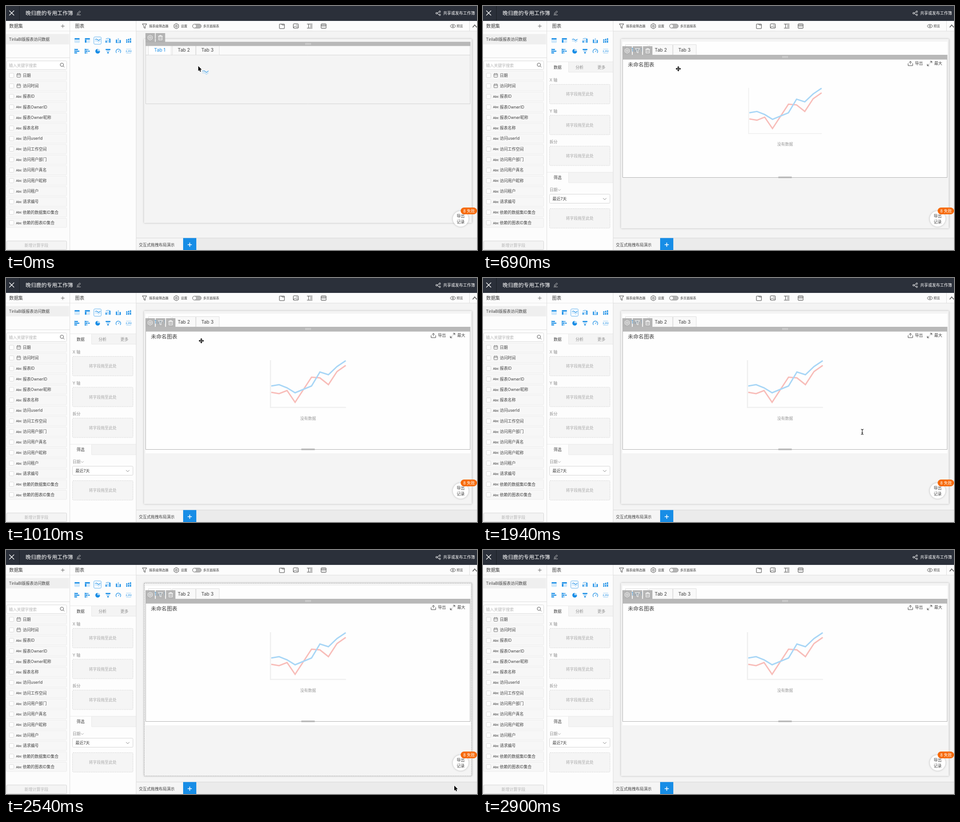
Recreate the animation shown at these times as an HTML page with a canvas. Size 1037 by 540 pixels, loop 3520 ms.

```html
<!DOCTYPE html>
<html lang="zh-CN">
<head>
<meta charset="utf-8">
<style>
html, body { margin: 0; width: 100%; height: 100%; overflow: hidden; background: #f4f4f4; }
canvas { display: block; width: 1037px; height: 540px; }
</style>
</head>
<body>
<canvas id="stage"></canvas>
<script>
const W = 1037, H = 540, LOOP = 3520;
const canvas = document.getElementById('stage');
const c = canvas.getContext('2d');
const dpr = window.devicePixelRatio || 1;
canvas.width = W * dpr;
canvas.height = H * dpr;

const BLUE = '#178de6', PALE = '#9fd0f5', INK = '#404040', MUTED = '#8c8c8c';
const GREY = '#b8b8b8', RULE = '#dedede', SOFT = '#e8e8e8';
const FONT = 'Inter, "Noto Sans CJK SC", "Noto Sans CJK", sans-serif';
const BASE = 8.75, SMALL = 7.1, MID = 10.2, BIG = 11.65;
const times = (n, f) => { for (let i = 0; i < n; i++) f(i); };

function text(s, x, y, size = BASE, color = INK, align = 'left', weight = 400, font = FONT) {
  c.font = `${weight} ${size}px ${font}`;
  c.textAlign = align;
  c.fillStyle = color;
  c.fillText(s, x, y + size * 0.37);
}

function paint(fill, stroke, lw = 1) {
  if (fill) { c.fillStyle = fill; c.fill(); }
  if (stroke) { c.strokeStyle = stroke; c.lineWidth = lw; c.stroke(); }
}

function box(x, y, w, h, fill, stroke, r = 0, lw = 1) {
  c.beginPath();
  c.roundRect(x, y, w, h, r);
  paint(fill, stroke, lw);
}

function dashedBox(...args) {
  c.setLineDash([2.2, 1.6]);
  box(...args);
  c.setLineDash([]);
}

function disc(x, y, r, fill, stroke, lw) {
  c.beginPath();
  c.arc(x, y, r, 0, 7);
  paint(fill, stroke, lw);
}

function trace(pts) {
  c.beginPath();
  for (const [x, y] of pts) c.lineTo(x, y);
}

function path(pts, color, lw = 1) {
  trace(pts);
  paint(null, color, lw);
}

const hr = (x1, x2, y, color = RULE, lw = 1) => path([[x1, y], [x2, y]], color, lw);
const vr = (x, y1, y2, color = RULE, lw = 1) => path([[x, y1], [x, y2]], color, lw);

function at(x, y, draw, ...args) {
  c.save();
  c.translate(x, y);
  draw(...args);
  c.restore();
}

function glow(draw) {
  c.save();
  c.shadowColor = 'rgba(0,0,0,.26)';
  c.shadowBlur = 4 * dpr;
  draw();
  c.restore();
}

// Small icons, each centred on its own origin
function plus(r, color, lw = 1, turn = 0) {
  c.rotate(turn);
  hr(-r, r, 0, color, lw);
  vr(0, -r, r, color, lw);
}

function chevron(w, h, color, lw) {
  path([[-w, -h], [0, h], [w, -h]], color, lw);
}

function gear(color, r = 5.4) {
  trace(Array.from({ length: 6 }, (_, i) => [r * Math.sin(i * Math.PI / 3), r * Math.cos(i * Math.PI / 3)]));
  c.closePath();
  paint(null, color);
  disc(0, 0, r * 0.36, null, color);
}

function funnel(color) {
  const r = 4.8, n = 1.4;
  trace([[-r, -r], [r, -r], [n, 0], [n, r], [-n, r - n], [-n, 0]]);
  c.closePath();
  paint(null, color);
}

function trash(color) {
  hr(-5, 5, -3.2, color);
  box(-1.8, -5, 3.6, 1.8, null, color);
  box(-3.8, -3.2, 7.6, 8.2, null, color);
  for (const x of [-1.4, 1.4]) vr(x, -1, 3, color, 0.8);
}

function calendar() {
  box(-4, -3.5, 8, 7.5, null, '#666', 0.8, 0.9);
  hr(-4, 4, -0.8, '#666', 0.9);
  for (const x of [-2, 2]) vr(x, -5, -2.5, '#666', 0.9);
}

function pencil() {
  hr(-4.5, 4.5, 4.7, '#ddd', 0.9);
  c.rotate(-Math.PI / 4);
  box(-3.5, -1.3, 8, 2.6, null, '#ddd', 0.6, 0.9);
}

function share() {
  const nodes = [[3.5, -3.5], [-3.5, 0], [3.5, 3.5]];
  path(nodes, '#fff');
  for (const [x, y] of nodes) disc(x, y, 1.7, '#2b303a', '#fff');
}

function eye() {
  c.beginPath();
  c.ellipse(0, 0, 5.6, 3.7, 0, 0, 7);
  paint(null, INK, 0.9);
  disc(0, 0, 1.7, null, INK, 0.9);
}

function exportIcon() {
  path([[-5, 0], [-5, 5], [5, 5], [5, 0]], INK);
  vr(0, -4.5, 1.5, INK);
  at(0, -3, chevron, 3.2, -1.6, INK);
}

function expandIcon() {
  times(2, () => {
    c.rotate(Math.PI);
    path([[1, -5], [5, -5], [5, -1]], INK);
    path([[5, -5], [1, -1]], INK);
  });
}

function waves() {
  [BLUE, PALE].forEach((color, row) => {
    path([-1, 1, -1, 1].map((s, i) => [i * 4 - 6, row * 3.6 - 1.5 - s * (i ? 1.6 : -1)]), color, 1.2);
  });
}

function table(side) {
  box(-5, -4.5, 10, 9, '#fff', PALE, 0, 0.8);
  for (const s of [-1, 1]) {
    vr(s * 1.8, -3, 4.5, PALE, 0.8);
    hr(-5, 5, s * 1.4 + 0.9, PALE, 0.8);
  }
  box(-5.4, -5, 10.8, 2.8, BLUE);
  if (side) box(-5.4, -1.6, 3, 6.4, BLUE);
}

function bars(height, split) {
  times(3, i => {
    const h = height(i), x = i * 4.1 - 5.4;
    box(x, 5 - h, 2.6, h, i === 1 && !split ? PALE : BLUE);
    if (split) box(x, 5 - h * 0.6, 2.6, 1.1, '#fff');
  });
}

function rows(split) {
  vr(-5.4, -5.5, 5.5, BLUE, 0.9);
  times(3, i => {
    const w = i === 1 ? 10 : 7 - i, y = i * 3.8 - 5;
    box(-5, y, w, 2.4, BLUE);
    if (split) box(-5 + w * 0.55, y, 1.2, 2.4, '#fff');
  });
}

function pie() {
  disc(0, 0, 5.2, BLUE);
  c.beginPath();
  c.moveTo(0, 0);
  c.arc(0, 0, 5.2, -Math.PI / 2, 0);
  paint(PALE, '#fff', 0.8);
}

function steps() {
  times(3, i => box(i * 1.7 - 5.2, i * 3.6 - 5, 10.4 - i * 3.4, 2.6, i === 1 ? PALE : BLUE));
}

function gauge() {
  c.beginPath();
  c.arc(0, 0.5, 5.2, Math.PI * 0.78, Math.PI * 2.22);
  paint(null, BLUE, 1.2);
  path([[0, 1.5], [2.2, -1.8]], BLUE, 1.1);
}

function figure() {
  for (const y of [-4.6, 4.6]) hr(-5.5, 5.5, y, PALE);
  text('2,312', 0, 0, 5, BLUE, 'center', 600);
}

const chartIcons = [
  () => table(false), () => table(true), waves,
  () => { bars(i => 5 + i * 2); at(0, -4, chevron, 5, -1, BLUE, 0.9); },
  () => { bars(i => i === 1 ? 10 : 7 - i / 2); hr(-5.5, 5.5, 5, BLUE, 0.8); },
  () => bars(i => 7.5 + i * 1.2, true),
  () => rows(false), () => rows(true), pie, steps, gauge, figure
];

const fields = ['日期', '访问时间', '报表ID', '报表OwnerID', '报表Owner昵称', '报表名称', '访问userId', '访问工作空间',
  '访问用户部门', '访问用户真名', '访问用户昵称', '访问租户', '请求编号', '依赖的数据集ID集合', '依赖的图表ID集合'];

function topBar() {
  box(0, 0, W, 33, '#2b303a');
  vr(29.5, 0, 33, '#191d24');
  at(12.5, 15.5, plus, 7.5, '#fff', 1.3, Math.PI / 4);
  text('晚归鹿的专用工作簿', 43, 16, BIG, '#fff');
  at(160, 15, pencil);
  at(951.5, 16, share);
  text('共享或发布工作簿', 962.5, 16, BASE, '#fff');
}

function dataPanel() {
  box(0, 33, 140, 507, '#fcfcfc');
  text('数据集', 7, 44.5, MID);
  at(125, 44.5, plus, 4, '#666');
  hr(0, 140, 55.5, SOFT);
  box(0, 62, 139, 23, '#efefef');
  text('TirilaBI版报表访问数据', 6.5, 73.5);
  hr(0, 140, 114.5);
  box(1.5, 121.5, 132, 19, '#fff', '#d9d9d9', 2);
  text('输入关键字搜索', 6.5, 131.5, BASE, '#b4b4b4');
  disc(123, 130, 3.7, null, '#555');
  path([[125.6, 132.7], [128.5, 135.6]], '#555');
  fields.forEach((name, i) => {
    const y = 153.5 + i * 23.29;
    box(1, y - 10, 132.5, 20.5, '#f7f7f7', '#ebebeb', 1.5);
    box(7.3, y - 4.8, 9.8, 9.8, '#fff', '#d9d9d9', 1.5);
    if (i < 2) at(28, y, calendar);
    else text('Abc', 22, y + 0.3, 7.2, '#555', 'left', 500, 'Roboto, sans-serif');
    text(name, 37, y);
  });
  box(1.5, 520, 132, 19.5, '#f4f4f4', '#d6d6d6', 2);
  text('新增计算字段', 67, 530, BASE, '#b4b4b4', 'center');
}

function dropZone(y) {
  dashedBox(146.5, y, 133, 43, '#f5f5f5', '#d4d4d4', 2);
  text('将字段拖至此处', 213, y + 21.5, BASE, '#aaa', 'center');
}

function tabStrip(y, names) {
  box(188.5, y, 97.5, 23, '#f4f4f4');
  hr(140, 286, y, SOFT);
  path([[188.5, y], [188.5, y + 23], [286, y + 23]], SOFT);
  names.forEach((s, i) => text(s, 155.5 + i * 48.2, y + 12, BASE, i ? MUTED : INK));
}

function configPanel() {
  tabStrip(123.5, ['数据', '分析', '更多']);
  ['X 轴', 'Y 轴', '拆分'].forEach((s, i) => {
    const y = 164 + i * 68.3;
    text(s, 146.5, y, BASE, MUTED);
    dropZone(y + 9.5);
  });
  tabStrip(368, ['筛选']);
  text('日期', 146.5, 407, BASE, MUTED);
  at(168, 407, chevron, 3, 1.5, MUTED, 0.8);
  box(146.5, 416.5, 133, 20, '#fff', '#d4d4d4', 2);
  text('最近7天', 153, 426.5);
  at(268, 427, chevron, 3.6, 1.9, '#777', 0.9);
  dropZone(448.5);
}

function chartPanel(selected, config) {
  box(140, 33, 146, 507, '#fdfdfd');
  text('图表', 152, 44.5, MID);
  hr(140, 286, 55.5, SOFT);
  if (selected) box(193.5, 68.5, 16, 16, '#fff', '#4ba6ec', 2, 0.9);
  chartIcons.forEach((icon, i) => at(156.5 + i % 6 * 22.7, i < 6 ? 76.3 : 100, icon));
  if (config) configPanel();
  for (const x of [140.5, 286.5]) vr(x, 33, H);
}

function folderIcon() {
  box(-5.5, -4.5, 11, 10, null, INK, 0.5);
  path([[-1, -4.5], [0.5, -2.5], [5.5, -2.5]], INK);
}

function imageIcon() {
  box(-5.5, -5, 11, 9.5, null, INK, 1);
  path([[-5, 3.5], [-1.5, -0.5], [1.5, 2.5], [3, 1], [5, 3]], INK, 0.9);
  disc(2.5, -2, 0.9, INK);
}

function textIcon() {
  hr(-6, 6, -4.5, INK);
  vr(-2.5, -4.5, 4, INK);
  for (const y of [-1.5, 1.5]) hr(1, 6, y, INK);
  hr(-6, 6, 4.5, INK);
}

function windowIcon() {
  box(-5.5, -5, 11, 10, null, INK, 1);
  hr(-5.5, 5.5, -2, INK, 1.3);
  times(3, i => box(i * 3 - 3.8, 0.5, 1.5, 1.2, INK));
}

function toolbar() {
  box(287, 33, 750, 22.5, '#fcfcfc');
  hr(287, W, 55.5);
  at(305, 44.5, funnel, INK);
  text('报表级筛选器', 315, 44.5, SMALL);
  at(375, 44.5, gear, INK, 5.8);
  text('设置', 385, 44.5, SMALL);
  box(410.5, 40, 19.5, 9, '#b5b5b5', '#8f8f8f', 4.5);
  disc(415, 44.5, 4, '#fff', '#8f8f8f', 0.8);
  text('多页面报表', 434, 44.5, SMALL);
  [folderIcon, imageIcon, textIcon, windowIcon].forEach((icon, i) => at(607.5 + i * 30.6, 44.5, icon));
  at(984, 44.5, eye);
  text('预览', 992, 44.5, SMALL);
  vr(1020.5, 33, 55);
  at(1032, 44.5, chevron, 4.5, -2.7, INK, 1.4);
}

function page(bottom, dashed) {
  glow(() => box(304, 73, 721.5, bottom - 73, '#f4f4f4'));
  if (dashed) dashedBox(304.5, 73.5, 720.5, bottom - 73.5, null, '#aaa');
}

function gripBar(y, h) {
  box(307, y, 715.5, h, GREY);
  times(12, i => box(659 + i % 6 * 2.2, y + h / 2 - 2 + (i > 5 ? 2.4 : 0), 1.2, 1.4, '#e6e6e6'));
}

function handles(y, icons) {
  icons.forEach((icon, i) => {
    box(307 + i * 22.6, y, 20.8, 20, 'rgba(165,165,165,.82)');
    at(317.4 + i * 22.6, y + 10, icon, '#fff');
  });
}

function tabs() {
  times(3, i => {
    const x = 313.5 + Math.round(i * 52.6);
    box(x, 85.5, i ? 51 : 50, 23, i ? '#f9f9f9' : '#fff', RULE);
    text('Tab ' + (i + 1), x + 25, 97.7, MID, i ? INK : BLUE, 'center');
  });
}

function emptyTabs(active) {
  box(307.5, 79.5, 715, 137, active ? '#fff' : '#f4f4f4');
  box(307.5, 88, 715, 20, active ? '#fff' : '#fafafa');
  hr(307, 1022, 108.5, '#d6d6d6');
  tabs();
  box(307.5, 79.5, 714.5, 137, null, active ? '#b8b8b8' : '#d2d2d2');
  gripBar(79.5, 9);
  handles(60, [gear, trash]);
}

// Two series share unevenly growing steps; the fifth slot is skipped
function series(ys, color) {
  path(ys.map((y, k) => {
    const i = k > 3 ? k + 1 : k;
    return [584 + 17.14 * i + 0.12 * i * i, y];
  }), color, 3);
}

function emptyChart(grown) {
  const k = grown ? 1 : 0.97;
  c.save();
  c.translate(665 * (1 - k), 182 * (1 - k) - (grown ? 0 : 1));
  c.scale(k, k);
  path([[582.3, 182], [582.3, 286.5], [748.5, 286.5]], '#efefef', grown ? 2.6 : 1.8);
  series([253, 256, 249, 275, 219.5, 221, 236, 207, 193.5], '#f8bdb9');
  series([239, 236, 243, 254, 239, 208, 214, 196, 183], '#a8d6f6');
  c.restore();
  text('没有数据', 665, grown ? 311 : 305.5, BASE, '#999', 'center');
}

function chartCard(grown) {
  box(307, 79, 715.5, grown ? 309 : 300, '#fefefe');
  tabs();
  handles(89, [gear, funnel, trash]);
  box(307.5, 118, 714.5, 261.5, '#fefefe', '#b0b0b0');
  gripBar(108, 10);
  text('未命名图表', 319, 129.5, BIG);
  at(941, 127, exportIcon);
  text('导出', 951, 127);
  at(983.2, 127.3, expandIcon);
  text('最大', 993.5, 127);
  emptyChart(grown);
  box(650, 377.5, 30, 3.5, GREY, null, 1);
}

function footer() {
  box(287, 513.5, 750, 27, '#ebebeb');
  box(287, 513.5, 103, 27, '#f5f5f5');
  hr(287, W, 513.5, '#d8d8d8');
  text('交互式拖拽布局演示', 292.5, 528.3);
  box(390, 513.5, 29, 27, BLUE);
  at(404.5, 528.3, plus, 4.6, '#fff', 1.6);
}

function exportBadge() {
  glow(() => disc(1001, 471, 17.3, '#fff'));
  text('导出', 1001, 465, BASE, INK, 'center');
  text('记录', 1001, 477.5, BASE, INK, 'center');
  box(1001, 446, 36, 15, '#f66a0a', null, 7.5);
  text('8 失败', 1019.5, 453.7, BASE, '#fff', 'center');
}

const cursors = {
  arrow() {
    trace([[0, 0], [0, 11], [2.4, 8.8], [4, 12.6], [5.9, 11.8], [4.4, 8], [7.6, 7.8]]);
    c.closePath();
    paint(null, '#fff', 1.2);
    paint('#000');
  },
  move() {
    plus(4, '#fff', 3.2);
    plus(4, '#000', 1.5);
    times(4, () => {
      c.rotate(Math.PI / 2);
      trace([[5.8, 0], [2.8, -2.6], [2.8, 2.6]]);
      paint('#000');
    });
  },
  beam() {
    for (const [color, lw] of [['#fff', 2.6], ['#111', 1.1]]) {
      vr(0, -5, 5, color, lw);
      hr(-1.6, 1.6, 2, color, lw);
      for (const s of [-1, 1]) at(0, s * 5.4, chevron, 2.6, s * -0.7, color, lw);
    }
  }
};

// start time, cursor, x, y
const pointer = [
  [0, 'arrow', 423.3, 133], [150, 'move', 430, 139], [1940, 'beam', 835, 340.5], [2090, 'arrow', 831.5, 336.5],
  [2240, 'arrow', 891, 404], [2390, 'arrow', 979, 493], [2540, 'arrow', 987, 521.5], [2750, 'arrow', 1000, 537],
  [2900]
];

function render(t) {
  c.setTransform(dpr, 0, 0, dpr, 0, 0);
  box(0, 0, W, H, '#f4f4f4');
  const dropped = t >= 690, grown = t >= 840;
  dataPanel();
  chartPanel(t < 390 || t >= 1010, dropped);
  toolbar();
  page(grown ? 500 : dropped ? 492 : 480, t >= 2390 && t < 2750);
  if (dropped) chartCard(grown);
  else emptyTabs(t >= 390);
  footer();
  exportBadge();
  topBar();
  if (t < 390) {
    c.globalAlpha = 0.75;
    at(439, 147, () => { c.scale(1.15, 1.15); waves(); });
    c.globalAlpha = 1;
  }
  const [, kind, x, y] = pointer.findLast(p => p[0] <= t);
  if (kind) at(x, y, cursors[kind]);
}

const start = performance.now();
function tick() {
  render((performance.now() - start) % LOOP);
  requestAnimationFrame(tick);
}
tick();
</script>
</body>
</html>
```
